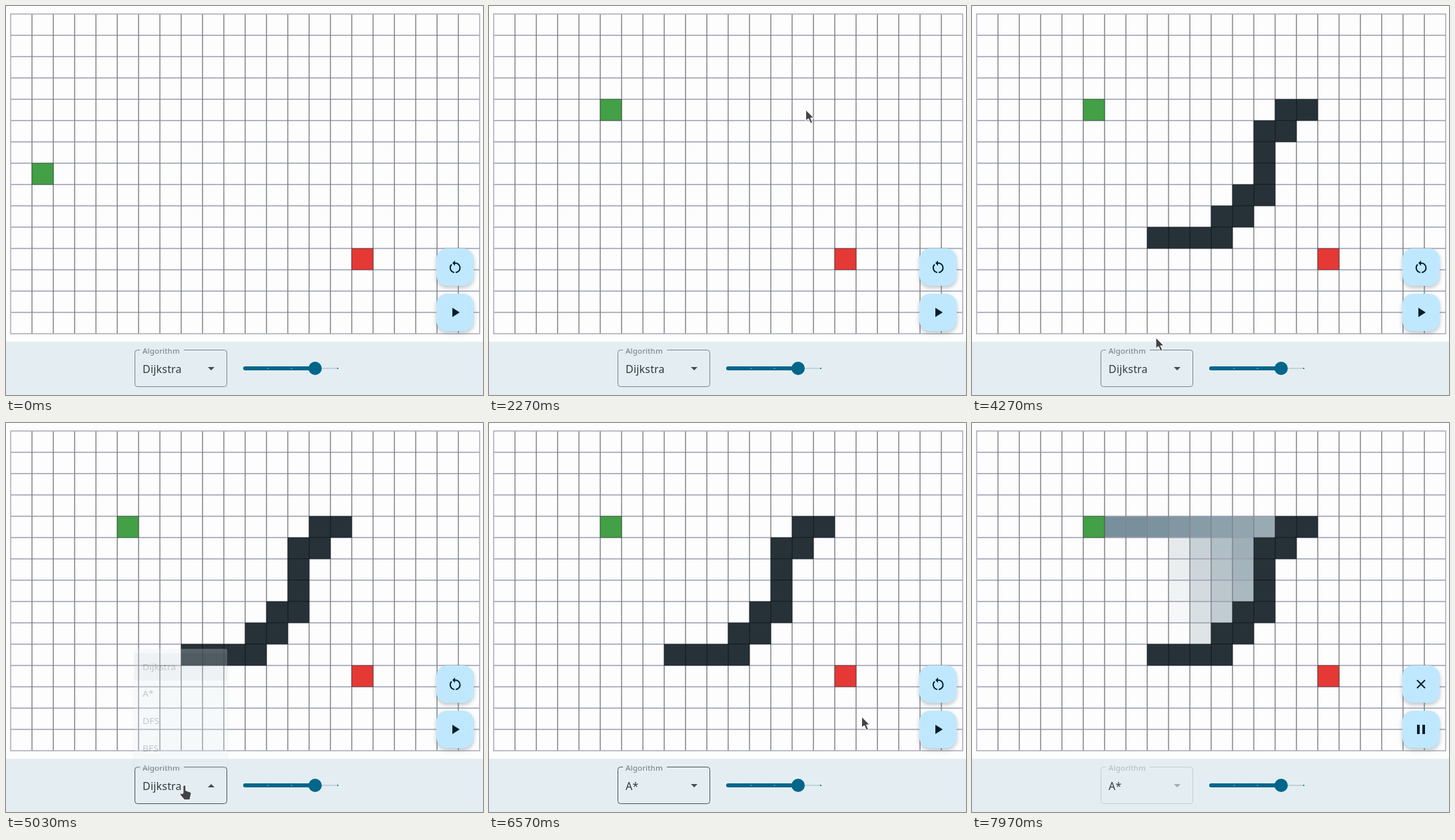
Animation of 716 by 584 pixels, one loop 8000 ms. Source, as an HTML page:

```html
<!DOCTYPE html>
<html lang="en">
<head>
<meta charset="utf-8">
<title>Pathfinding grid</title>
<style>
  html, body { margin: 0; width: 100%; height: 100%; overflow: hidden; background: #fdfdfd; }
  svg { display: block; width: 100%; height: 100%; }
  text { font-family: "Noto Sans", "Open Sans", sans-serif; fill: #22282c; }
  .panel { fill: #e4eef2; }
  .value { font-size: 16px; letter-spacing: .2px; fill: #33393d; }
  .item { font-size: 14px; }
  .label { font-size: 11.5px; letter-spacing: .2px; fill: #6d777d; }
  .fab { fill: #bfe8ff; filter: drop-shadow(0 3px 3px #5f6e7866); }
  .line { fill: none; stroke: #001e2c; stroke-width: 2; }
  .solid { fill: #001e2c; }
  .cell { stroke: #00000060; }
  .pointer { fill: #424347; stroke: #fdfdfd; stroke-linejoin: round; }
</style>
</head>
<body>
<svg viewBox="0 0 716 584" preserveAspectRatio="none">
  <rect width="716" height="584" fill="#fdfdfd"/>
  <g id="visited" fill="#78909c"></g>
  <g id="grid" fill="none" stroke-width="1.5"></g>
  <g id="walls" fill="#263238"></g>
  <rect id="goal" class="cell" width="32" height="32" fill="#e53935"/>
  <rect id="start" class="cell" width="32" height="32" fill="#43a047"/>
  <rect class="panel" y="504" width="716" height="80"/>

  <rect id="outline" x="193.5" y="516.5" width="138" height="55" rx="4" fill="none"/>
  <path d="M201 516.5H267" stroke="#e4eef2" stroke-width="3"/>
  <text id="label" class="label" x="205" y="522">Algorithm</text>
  <text id="value" class="value" x="205" y="551">Dijkstra</text>
  <path id="arrow" d="M-5-2.5H5L0 2.5z" fill="#444c51"/>

  <g fill="#00668a">
    <path d="M472 544H498" stroke="#b9c9d0" stroke-width="1.5"/>
    <circle cx="498" cy="544" r="1"/>
    <rect x="356" y="541" width="108" height="6" rx="3"/>
    <path d="M392.5 544h2m33 0h2" stroke="#6aa9c4" stroke-width="1.5"/>
    <circle cx="464" cy="544" r="10"/>
  </g>

  <rect class="fab" x="646" y="364" width="56" height="56" rx="16"/>
  <rect id="playFab" class="fab" x="646" y="432" width="56" height="56" rx="16"/>
  <g id="idleIcons" transform="translate(662 380)">
    <path class="line" d="M7 8A7 7 0 0 0 11 20M12 6A7 7 0 0 1 13 20"/>
    <path class="solid" d="M12 2V10L8 6z"/>
    <path class="solid" d="M8 73v14l11-7z"/>
  </g>
  <g id="runIcons" transform="translate(662 380)">
    <path class="line" d="M6 6L18 18M18 6L6 18"/>
    <path class="solid" d="M6 73h4v14H6zM14 73h4v14h-4z"/>
  </g>

  <g id="menu">
    <rect class="panel" x="193" y="308" width="139" height="209" rx="2" style="filter:drop-shadow(0 2px 2px #50607055)"/>
  </g>
  <path id="pointer" class="pointer"/>
</svg>
<script>
const LOOP = 8000, CELL = 32, LEFT = 7, TOP = 12, COLS = 22, ROWS = 15;
const DRAG_START = 850, DRAG_END = 1500, PAINT = 2480, PAINT_STEP = 100;
const OPEN = 5000, PICK = 5840, PLAY = 7410;
const SEARCH = 7440, VISIT_STEP = 22, VISIT_FADE = 500;
const ARROW = 'M0 0V16L4 13 7 20 10 19 7 12H12z';
const HAND = 'M-2 12V2a2 2 0 0 1 4 0V8l6 2q3 1 2 3l-2 9h-8l-6-7q-1-2 0-3 1 0 2 1z';

const $ = id => document.getElementById(id);
const clamp = v => Math.max(0, Math.min(1, v));
const ease = k => k * k * (3 - 2 * k);
const show = (el, on) => el.setAttribute('visibility', on ? 'visible' : 'hidden');

function add(parent, tag, attrs, text = '') {
  const el = document.createElementNS('http://www.w3.org/2000/svg', tag);
  for (const name in attrs) el.setAttribute(name, attrs[name]);
  el.textContent = text;
  parent.append(el);
  return el;
}
function place(el, col, row) {
  el.setAttribute('x', LEFT + col * CELL);
  el.setAttribute('y', TOP + row * CELL);
}
function addCell(parent, [col, row], attrs) {
  const el = add(parent, 'rect', { width: CELL, height: CELL, ...attrs });
  place(el, col, row);
  return el;
}

const width = COLS * CELL, height = ROWS * CELL;
for (let r = 1; r < ROWS; r++)
  add($('grid'), 'path', { d: `M${LEFT} ${TOP + r * CELL}h${width}`, stroke: '#9b9cb2' });
for (let c = 1; c < COLS; c++)
  add($('grid'), 'path', { d: `M${LEFT + c * CELL} ${TOP}v${height}`, stroke: '#82848a' });
add($('grid'), 'rect', { x: LEFT, y: TOP, width, height, stroke: '#a9abb8' });
place($('goal'), 16, 11);

// The wall is one brush stroke of single-cell moves.
const wallCells = [[15, 4]];
for (const move of 'LDLDDDLDLDLLL') {
  const [c, r] = wallCells.at(-1);
  wallCells.push(move === 'L' ? [c - 1, r] : [c, r + 1]);
}
const walls = wallCells.map(cell => addCell($('walls'), cell, { class: 'cell' }));

// The search runs along the row to the wall, then down each column leftwards.
const blocked = (col, row) => wallCells.some(([c, r]) => c === col && r === row);
const order = [];
for (let c = 6; !blocked(c, 4); c++) order.push([c, 4]);
for (let c = 12; c > 8; c--)
  for (let r = 5; r < 10 && !blocked(c, r); r++) order.push([c, r]);
const visited = order.map(cell => addCell($('visited'), cell));

// Pointer stops: time, x, y.
const stops = [
  [120, 722, -24], [800, 54, 250], [DRAG_START, 54, 250], [DRAG_END, 182, 157], [2440, 503, 156],
  ...wallCells.map(([c, r], i) =>
    [PAINT + i * PAINT_STEP, LEFT + (c + .5) * CELL, TOP + (r + .5) * CELL]),
  [4270, 276, 498], [4500, 268, 545], [OPEN, 268, 545], [5600, 250, 390], [PICK, 250, 390],
  [6950, 674, 460], [7640, 674, 460], [7860, 735, 470]
];
function pointerAt(t) {
  const next = stops.findIndex(([time]) => time > t);
  if (next < 1) return stops.at(next).slice(1);
  const [t0, x0, y0] = stops[next - 1], [t1, x1, y1] = stops[next];
  const k = ease((t - t0) / (t1 - t0));
  return [x0 + (x1 - x0) * k, y0 + (y1 - y0) * k];
}

const items = ['Dijkstra', 'A*', 'DFS', 'BFS'].map((name, i) => {
  const y = 316 + i * 48;
  const shade = add($('menu'), 'rect', { x: 193, y, width: 139, height: 48, fill: '#22343e' });
  add($('menu'), 'text', { x: 205, y: y + 29, class: 'item' }, name);
  return { shade, y };
});

function drawField(t, open) {
  const running = t >= PLAY, focused = t >= OPEN && !running;
  $('value').textContent = t < PICK ? 'Dijkstra' : 'A*';
  $('outline').setAttribute('stroke', focused ? '#465158' : '#78838a');
  $('outline').setAttribute('opacity', running ? .3 : 1);
  $('label').setAttribute('opacity', running ? .45 : 1);
  $('arrow').setAttribute('opacity', running ? .4 : 1);
  $('arrow').setAttribute('transform', `translate(308 544.5) scale(1 ${open ? -1 : 1})`);
}

function drawMenu(t, open, x, y) {
  const fade = open ? clamp((t - OPEN) / 120) : 1 - clamp((t - PICK) / 100);
  const scale = open ? .8 + .2 * fade : 1;
  show($('menu'), t >= OPEN && fade > 0);
  $('menu').setAttribute('opacity', fade);
  $('menu').setAttribute('transform', `translate(0 ${517 * (1 - scale)}) scale(1 ${scale})`);
  items.forEach((item, i) => {
    const hover = x > 193 && x < 332 && y >= item.y && y < item.y + 48;
    item.shade.setAttribute('opacity', i === 0 ? .13 : hover ? .08 : 0);
  });
}

function drawPointer(open, x, y) {
  const inside = (l, top, r, b) => x > l && x < r && y > top && y < b;
  const overPlay = inside(646, 432, 702, 488);
  const overField = inside(193, open ? 316 : 516, 332, 572);
  $('pointer').setAttribute('d', overPlay || overField ? HAND : ARROW);
  $('pointer').setAttribute('transform', `translate(${x} ${y})`);
  $('playFab').style.fill = overPlay ? '#a0c3d5' : '';
}

function draw(t) {
  const [x, y] = pointerAt(t);
  const open = t >= OPEN && t < PICK;
  const [startX, startY] = pointerAt(Math.max(DRAG_START, Math.min(t, DRAG_END)));
  place($('start'), Math.floor((startX - LEFT) / CELL), Math.floor((startY - TOP) / CELL));
  walls.forEach((wall, i) => show(wall, t >= PAINT + (i - .5) * PAINT_STEP));
  visited.forEach((cell, i) =>
    cell.setAttribute('opacity', clamp((t - SEARCH - i * VISIT_STEP) / VISIT_FADE)));
  show($('idleIcons'), t < PLAY);
  show($('runIcons'), t >= PLAY);
  drawField(t, open);
  drawMenu(t, open, x, y);
  drawPointer(open, x, y);
}

const began = performance.now();
function tick() {
  draw((performance.now() - began) % LOOP);
  requestAnimationFrame(tick);
}
tick();
</script>
</body>
</html>
```
